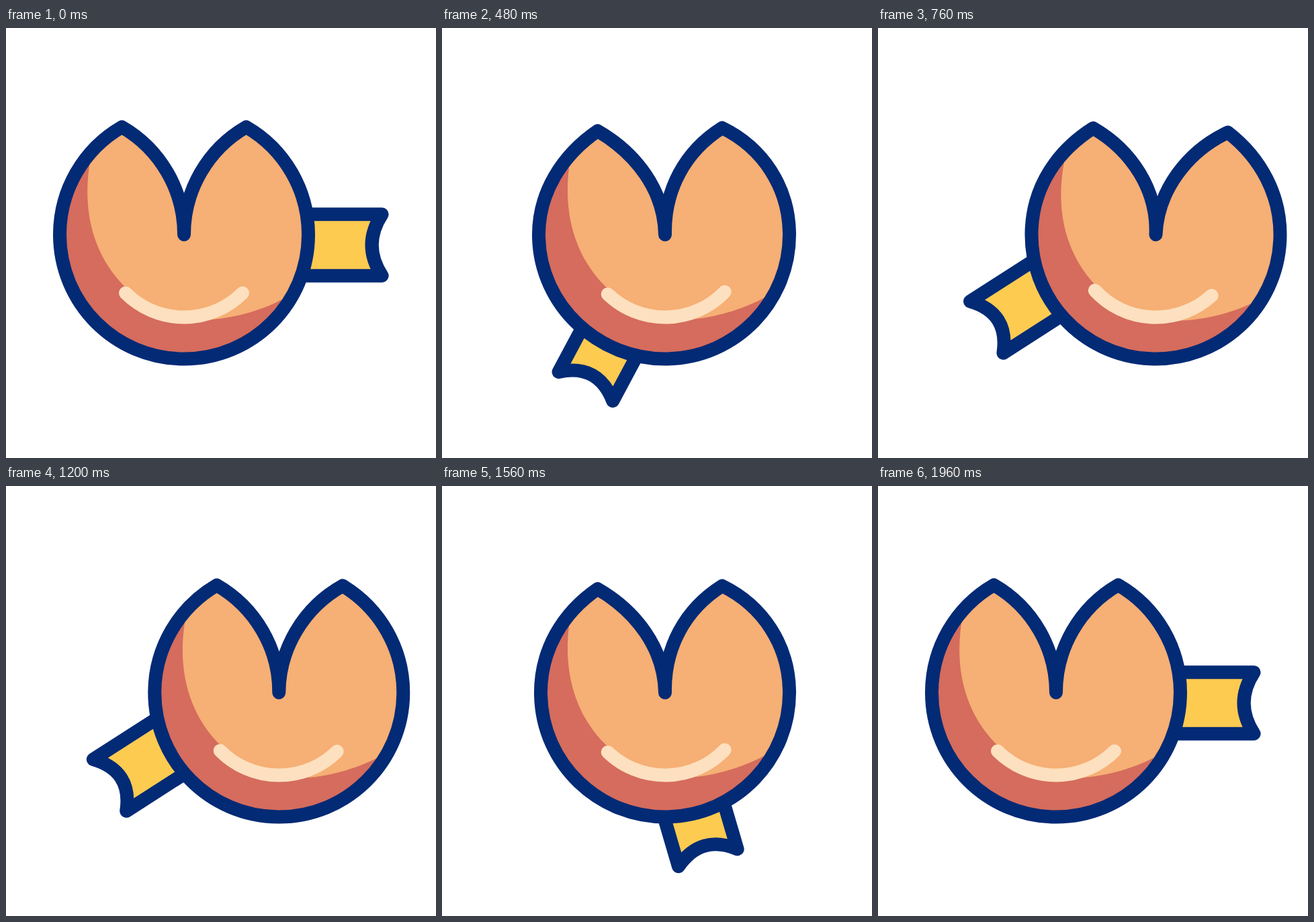
An HTML page that plays this animation: 640 px wide and 640 px high, repeating every 2 s.

```html
<!DOCTYPE html>
<html lang="en">
<head>
<meta charset="utf-8">
<title>Rocking fortune cookie</title>
<style>
html, body { margin: 0; width: 100%; height: 100%; overflow: hidden; background: #fff; }
svg { display: block; width: 100%; height: 100%; }
.line { stroke: #032a75; stroke-width: 20; stroke-linejoin: round; stroke-linecap: round; }
</style>
</head>
<body>
<svg viewBox="0 0 640 640">
  <defs><clipPath id="inside"><path id="mask"/></clipPath></defs>
  <path id="slip" class="line" fill="#fdcb50"/>
  <g id="cookie">
    <g clip-path="url(#inside)">
      <rect x="-260" y="-260" width="520" height="520" fill="#f6af74"/>
      <path fill="#d56c5d" d="M-139-128 L-141-102.5 C-153-17.5-125 42.5-85 80.5 C-50 114.5-5 129.5 40 126.5 C80 123.5 120 110.5 146 96.5 L190 72 V260 H-260 V-128 Z"/>
    </g>
    <path d="M-87 87 A123 123 0 0 0 87 87" fill="none" stroke="#fde0bf" stroke-width="20" stroke-linecap="round"/>
    <path id="outline" class="line" fill="none"/>
  </g>
</svg>
<script>
const LOOP = 2000, STEP = 40, R = 185, CX = 265, CY = 307.5;
const TIP_Y = -R * Math.sin(Math.PI / 3);
const ARC60 = 66, ARC90 = 102.2; // handle lengths for arcs of 60 and 90 degrees
const el = id => document.getElementById(id);
const rad = deg => deg * Math.PI / 180;
const part = (t, from, to) => Math.min(1, Math.max(0, (t - from) / (to - from)));
const ease = u => u * u * (3 - 2 * u);
const ramp = (t, from, to) => ease(part(t, from, to));

function arm(x, y, deg, length, side) {
  return `${x + side * length * Math.cos(rad(deg))} ${y + length * Math.sin(rad(deg))}`;
}

// A tip that leans outwards gets a steeper, shorter shoulder
function shoulder(x, y, side) {
  const out = side * x - R / 2;
  return arm(x, y, 30 + 0.65 * out, ARC60 - 0.6 * out, side);
}

function cookiePath(wind, over, turn, swell) {
  const lx = -R / 2 + 5 * wind - 15 * over, ly = TIP_Y - 4 * wind + 12 * over;
  const rx = R / 2 - 25 * wind + 16 * over, ry = TIP_Y - wind + 7 * over;
  const left = -R - swell, notch = 30 - turn;
  return `M${lx} ${ly}
    C${shoulder(lx, ly, -1)} ${left} ${-ARC60} ${left} 0
    C${left} ${ARC90} ${-ARC90} ${R} 0 ${R}
    C${ARC90} ${R} ${R} ${ARC90} ${R} 0
    C${R} ${-ARC60} ${shoulder(rx, ry, 1)} ${rx} ${ry}
    C${arm(rx, ry, notch, ARC60, -1)} 0 ${-ARC60} 0 0
    C0 ${-ARC60} ${arm(lx, ly, notch, ARC60, 1)} ${lx} ${ly}Z`;
}

function drawCookie(t, goingOut) {
  // The way back retraces the way out
  const s = goingOut ? t : 2040 - t;
  const launch = ramp(s, 320, 640), settle = ramp(s, 640, 880);
  const wind = ramp(s, 80, 320) - launch, over = launch - settle;
  const x = CX - 23 * wind + 157 * over + 140 * settle;
  const turn = 5 * over - 7.2 * wind;
  const d = cookiePath(wind, over, turn, goingOut ? 6 * wind : 0);
  el("outline").setAttribute("d", d);
  el("mask").setAttribute("d", d);
  el("cookie").setAttribute("transform", `translate(${x} ${CY}) rotate(${turn})`);
  return x;
}

// The slip swings under the cookie, tucked in and lagging halfway
function drawSlip(t, goingOut, cx) {
  const u = goingOut ? part(t, 80, 640) : part(t, 1200, 1920);
  const swing = goingOut ? ease(u) : 1 - ease(u);
  const mid = Math.sin(Math.PI * u);
  const turn = 147.3 * swing;
  const at = rad(turn + 3 + swing - (goingOut ? 5.5 : 1.7) * mid);
  const reach = 295 - 8 * swing - (goingOut ? 43 : 37) * mid;
  const dip = 15 + 5 * Math.sqrt(swing);
  const x = cx + reach * Math.cos(at), y = CY + reach * Math.sin(at);
  el("slip").setAttribute("d", `M-150-45.7 H0 Q${-2 * dip} 0 0 45.7 H-150Z`);
  el("slip").setAttribute("transform", `translate(${x} ${y}) rotate(${turn})`);
}

function draw(t) {
  const goingOut = t < 1020;
  drawSlip(t, goingOut, drawCookie(t, goingOut));
}

const start = performance.now();
function tick() {
  const t = (performance.now() - start) % LOOP;
  draw(Math.floor(t / STEP) * STEP);
  requestAnimationFrame(tick);
}
tick();
</script>
</body>
</html>
```
